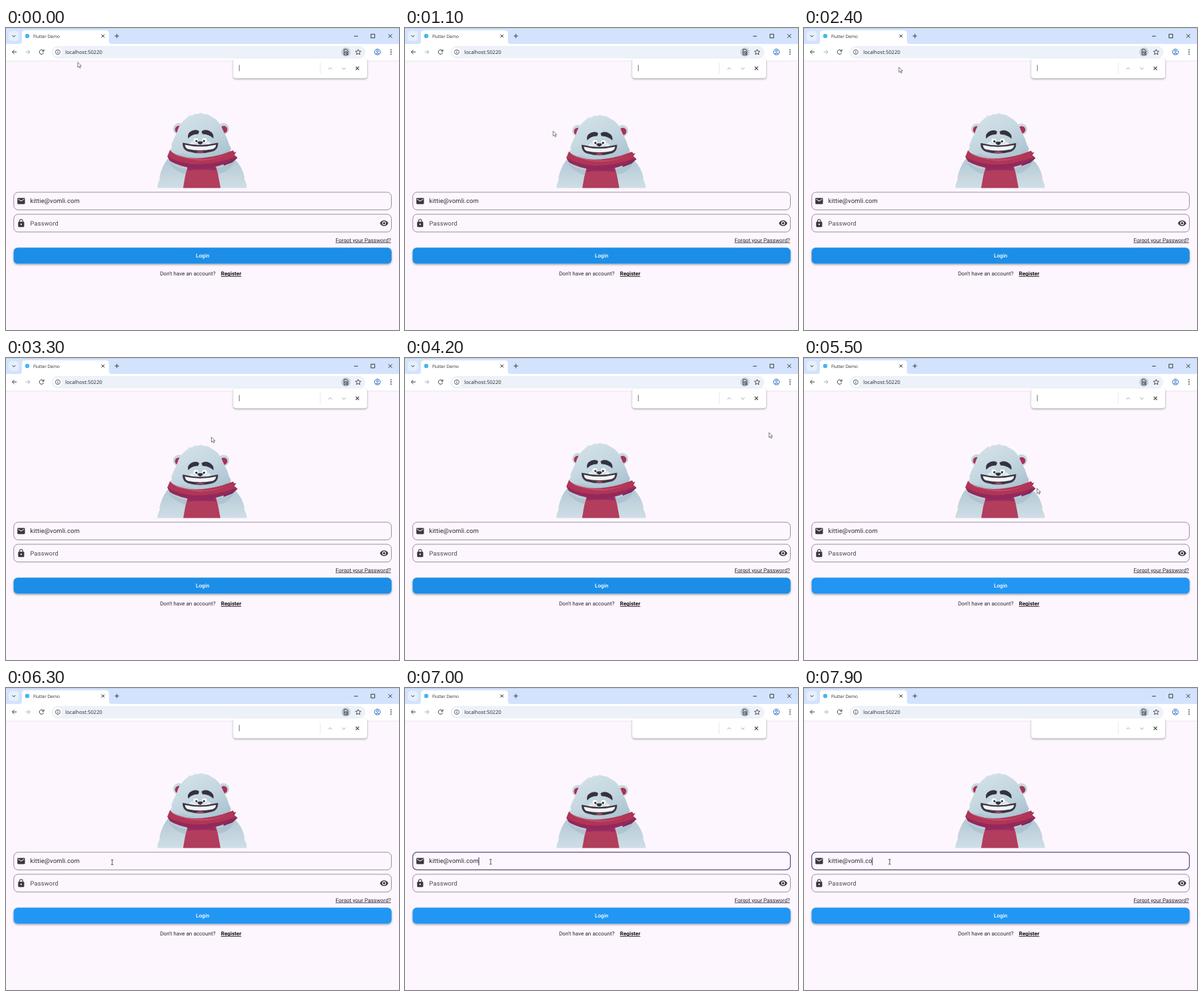
Recreate the animation shown at these times as an HTML page. Size 592 by 454 pixels, loop 8000 ms.

```html
<!DOCTYPE html>
<html lang="en">
<head>
<meta charset="utf-8">
<title>Login</title>
<style>
html, body { margin: 0; width: 100%; height: 100%; overflow: hidden; background: #fdf6fe; }
svg { display: block; }
text { font: 8.15px Roboto, sans-serif; letter-spacing: .02px; fill: #28252c; text-rendering: geometricPrecision; }
.ui { font-family: "Open Sans", sans-serif; letter-spacing: 0; }
.field { font-size: 9.3px; letter-spacing: .17px; }
.link { text-decoration: underline; }
.line { fill: none; stroke: #36383c; stroke-width: 1; }
.box { fill: none; stroke: #7d7882; stroke-width: .8; }
.icon { fill: #3b3740; }
</style>
</head>
<body>
<svg width="592" height="454" viewBox="0 0 592 454">
  <defs>
    <filter id="shadow" x="-10%" y="-30%" width="120%" height="180%">
      <feDropShadow dx="0" dy="1.4" stdDeviation="1.7" flood-opacity=".4"/>
    </filter>
    <linearGradient id="fur" x1="0" y1="0" x2=".6" y2="1">
      <stop stop-color="#d8e4ea"/><stop offset=".55" stop-color="#c4d7e0"/><stop offset="1" stop-color="#aac2d0"/>
    </linearGradient>
    <linearGradient id="coat" x1="0" y1="0" x2="0" y2="1">
      <stop stop-color="#b0c6d2"/><stop offset="1" stop-color="#d0dfe7"/>
    </linearGradient>
    <clipPath id="cut"><path d="M200 100H400V240.500H200Z"/></clipPath>
  </defs>

  <!-- browser frame -->
  <path fill="#d3e3fd" d="M0 0H592V24H0Z"/>
  <path fill="#bcc9de" d="M0 0H592V.8H0Z"/>
  <path fill="#fff" d="M0 24H20Q24 24 24 20V8Q24 3.500 28.500 3.500H150.500Q155 3.500 155 8V20Q155 24 159 24H592V49.500H0Z"/>
  <path stroke="#e3e0e8" stroke-width=".7" d="M0 49.700H592"/>
  <rect x="4" y="4.500" width="15.500" height="15" rx="5" fill="#e6effd"/>
  <path class="line" d="M9.500 11 11.800 13.300 14.100 11M143.700 9.700l4.600 4.600m0-4.600l-4.600 4.600M163.800 12h6.400M167 8.800v6.400"/>
  <circle cx="32" cy="12" r="3.200" fill="#48b5ef"/>
  <text class="ui" x="41" y="14.500" style="font-size:6.500px">Flutter Demo</text>
  <path class="line" stroke-width=".9" d="M524.300 12.300h5.600M549.800 9.300h5.600v5.600h-5.600zM576 9.300l5.600 5.600m0-5.600l-5.600 5.600"/>

  <rect x="68.500" y="27" width="473" height="18.800" rx="9.400" fill="#edf2fa"/>
  <path class="line" d="M16 36H9.500M12.500 32.900 9.400 36 12.500 39.100"/>
  <path class="line" style="stroke:#aaacb0" d="M29.700 36h6.300M33 32.900 36.100 36 33 39.100"/>
  <path class="line" d="M56.600 34.700A3.300 3.300 0 1 0 56.700 37.200M57 32.200V35H54.200"/>
  <circle cx="78" cy="36.200" r="6.800" fill="#fff"/>
  <circle class="line" cx="78" cy="36.200" r="3.500" style="stroke-width:.8"/>
  <path class="line" d="M78 35.700v2.500M78 34v.9"/>
  <text class="ui" x="89.300" y="39.400" style="font-size:7.600px">localhost:50220</text>
  <circle cx="512" cy="36.200" r="7" fill="#c9d2df"/>
  <path class="line" d="M509.200 32h3.800l2 2v6.400h-5.800z"/>
  <circle class="line" cx="512.200" cy="36.800" r="1.500"/>
  <path class="line" d="M513.300 38l1.500 1.700"/>
  <path class="line" style="stroke-width:.9" d="M530.500 32.100l1.200 2.700 2.900.3-2.200 1.900.7 2.900-2.600-1.500-2.600 1.500.7-2.900-2.200-1.900 2.900-.3z"/>
  <g class="line" style="stroke:#2868c8"><circle cx="559.500" cy="36" r="4.300"/><circle cx="559.500" cy="34.800" r="1.500"/><path d="M556.500 39q3-2.200 6 0"/></g>
  <g class="icon"><circle cx="580" cy="32.800" r=".9"/><circle cx="580" cy="36" r=".9"/><circle cx="580" cy="39.200" r=".9"/></g>

  <!-- bear -->
  <g clip-path="url(#cut)">
    <g id="body">
      <path fill="url(#coat)" d="M246 194Q238 202 233 217L231 225 232 226 228.500 235 228 242H363L362 234 358.500 226 359.500 225Q356 208 345 198L336 190H252Z"/>
      <path fill="#97aebe" opacity=".4" d="M245 202Q264 214 282 212L272 220Q254 216 245 202ZM316 211Q333 208 345 199 338 216 321 219Z"/>
    </g>
    <g id="head">
      <g fill="#c6d8e1"><circle cx="260.500" cy="150.500" r="8.700"/><circle cx="327.500" cy="150.500" r="8.700"/></g>
      <g fill="#aa3156"><circle cx="260" cy="151.500" r="5.500"/><circle cx="328" cy="151.500" r="5.500"/></g>
      <path fill="url(#fur)" d="M270 136 277 130 279 131 286 127.500 288 128.500 294 126.500 297 128 304 129 309 132Q322 138 327 153L333 165 336 174 339 180 336 189Q318 207 291 205 262 205 249 192L246 184 250 178 249 175 253 165 257 157Q261 143 270 136Z"/>
      <path fill="#a9c1cf" opacity=".6" d="M266 187Q292 199 323 187L335 181 335 190Q314 207 291 205 266 204 250 192Z"/>
      <path fill="#35323f" d="M274.500 165Q272 157.500 280 153.500 288 150.500 291 154.500L289.500 158.500Q280 158 274.500 165ZM296 158.500 294.500 154.500Q299 150.500 306 153.500 314 157.500 312.500 165 305 158 296 158.500Z"/>
      <path fill="#e0eaef" d="M276 172Q284 165 292.500 168 302 165 309 172L305 178H280Z"/>
      <g fill="#fff" stroke="#a8bbc8" stroke-width=".6"><circle cx="286" cy="168" r="4.100"/><circle cx="299" cy="168" r="4.100"/></g>
      <g fill="#30333d"><circle cx="286.800" cy="168.800" r="1.700"/><circle cx="298.300" cy="168.800" r="1.700"/>
        <path d="M288.500 170Q292.500 168.500 296.800 170 297 172.200 293.700 174.200H291.800Q288 172.200 288.500 170Z"/></g>
      <path fill="#403543" d="M266 171.500 269 172Q292 178 316.500 172L319.500 171.500Q320 181.500 311.500 184.500 292 190 274 184.500 265.500 181.500 266 171.500Z"/>
      <path fill="#f2f5f7" d="M269.500 174.500Q292 180 316.500 174.500 316 179 311.500 181 292 185 274 181 270 179.500 269.500 174.500Z"/>
      <path fill="#c24264" d="M286 185.500Q292.500 182.500 299 185.500 293 187.500 286 185.500Z"/>
    </g>
    <g id="scarf">
      <path fill="#7d285a" d="M325 194 347 186 343 192 349 195 341 202 328 207Z"/>
      <path fill="#b23d5c" d="M274 207 316 207 319 218 323.500 242H266.500L270 222Z"/>
      <path fill="#982b63" d="M273 208Q291 213 306 208L313 206 317 214Q296 212 274 214Z"/>
      <path fill="#b03556" d="M247 183.500Q253 191 265 194 292 199 325 190L342 184 345 188 343 190 348 194 341 198Q327 207 301 210 272 213 247 199L243 193Z"/>
      <path fill="#93295b" d="M243 193Q259 203 286 205 319 205 347 193L340 199Q325 208 301 211 270 213 247 200Z"/>
      <path fill="#c64d6b" d="M249 186Q265 196 292 197 314 198 333 190 313 200 289 199 264 197 249 186Z"/>
    </g>
  </g>

  <!-- form -->
  <rect id="email" class="box" x="11.700" y="246.900" width="568.800" height="26.500" rx="6.500"/>
  <rect class="box" x="11.700" y="280" width="568.800" height="26.700" rx="6.500"/>
  <path class="icon" transform="translate(16 253.300) scale(.57)" d="M20 4H4c-1.100 0-2 .9-2 2v12c0 1.100.9 2 2 2h16c1.100 0 2-.9 2-2V6c0-1.100-.9-2-2-2zm0 4l-8 5-8-5V6l8 5 8-5z"/>
  <path class="icon" transform="translate(16 286.600) scale(.57)" d="M18 8h-1V6A5 5 0 0 0 7 6v2H6c-1.100 0-2 .9-2 2v10c0 1.100.9 2 2 2h12c1.100 0 2-.9 2-2V10c0-1.100-.9-2-2-2zm-6 9a2 2 0 1 1 0-4 2 2 0 0 1 0 4zm3.100-9H8.900V6a3.100 3.100 0 0 1 6.200 0z"/>
  <path class="icon" transform="translate(562.700 286.600) scale(.57)" d="M12 4.500C7 4.500 2.700 7.600 1 12c1.700 4.400 6 7.500 11 7.500s9.300-3.100 11-7.500c-1.700-4.400-6-7.500-11-7.500zM12 17a5 5 0 1 1 0-10 5 5 0 0 1 0 10zm0-8a3 3 0 1 0 0 6 3 3 0 0 0 0-6z"/>
  <text id="address" class="field" x="36.500" y="263.200">kittie@vomli.com</text>
  <path id="caret" stroke="#4b3d70" stroke-width="1.100" d="M0 254.500V266.500"/>
  <text class="field" x="36.500" y="296.700" style="fill:#49454f">Password</text>
  <text class="link" x="496.500" y="321.500">Forgot your Password?</text>
  <rect id="login" x="11.500" y="330.200" width="569.300" height="24" rx="6" filter="url(#shadow)"/>
  <text x="286" y="345.200" style="fill:#fff;font-weight:500">Login</text>
  <text x="232" y="372.100">Don't have an account?</text>
  <text class="link" x="323.800" y="372.100" style="font-weight:700;fill:#111;letter-spacing:0">Register</text>

  <!-- find bar -->
  <rect x="342.500" y="45.800" width="201.500" height="29.500" rx="4" fill="#fff" filter="url(#shadow)"/>
  <path stroke="#dde3ee" stroke-width=".8" d="M473.300 52V69"/>
  <path class="line" style="stroke:#a2a4a8" d="M485.700 62.200 488.300 59.600 490.900 62.200M506.200 59.600 508.800 62.200 511.400 59.600"/>
  <path class="line" style="stroke-width:1.100" d="M526.800 58.200l5 5m0-5l-5 5"/>
  <path id="findCaret" stroke="#555" stroke-width=".8" d="M351.400 55.500V65"/>

  <path id="arrow" fill="#fff" stroke="#444" stroke-width=".7" d="M0 0V7.600L1.800 6 3.100 8.800 4.400 8.200 3.200 5.500H5.500Z"/>
  <path id="beam" fill="none" stroke="#333" stroke-width=".8" d="M-1.700-3.600H1.700M-1.700 3.600H1.700M0-3.600V3.600"/>
</svg>
<script>
const $ = id => document.getElementById(id);
const LOOP = 8000, CLICK = 6700, ERASE = 7700;
const address = $("address"), full = address.textContent;

// pointer stops: time, x, y
const stops = [
  [0, 108, 51.5], [200, 108, 51.5], [1000, 223, 155], [1800, 226, 152], [2400, 143, 59], [2700, 106, 52],
  [3000, 120, 110], [3650, 546, 130], [4200, 548.3, 112], [4600, 440, 335],
  [5000, 330, 345], [5500, 351, 196], [5900, 300, 345], [6300, 160, 262],
  [6500, 129, 261.3], [LOOP, 129, 261.3]
];

function pointer(t) {
  const i = stops.findIndex(s => s[0] > t), [t0, x0, y0] = stops[i - 1], [t1, x1, y1] = stops[i];
  const u = (t - t0) / (t1 - t0), k = u * u * (3 - 2 * u);
  return [x0 + (x1 - x0) * k, y0 + (y1 - y0) * k];
}

const show = (id, on) => $(id).setAttribute("visibility", on ? "visible" : "hidden");
const move = (id, x, y) => $(id).setAttribute("transform", `translate(${x} ${y})`);

function draw(t) {
  const breath = (1 - Math.cos((t - 100) * Math.PI / 1000)) / 2;
  move("head", 0, 1 + 3 * breath);
  move("scarf", 0, 2 * breath);
  move("body", 0, breath);

  const [x, y] = pointer(t), overField = y > 247 && y < 307;
  move("arrow", x, y);
  move("beam", x, y);
  show("arrow", !overField);
  show("beam", overField);

  const focused = t >= CLICK, erased = t >= ERASE;
  $("email").style.stroke = focused ? "#574b80" : "";
  $("email").style.strokeWidth = focused ? 1.2 : "";
  $("login").setAttribute("fill", t < 5200 ? "#1e8ee7" : "#2196f3");
  address.textContent = erased ? full.slice(0, -1) : full;
  move("caret", 36.7 + address.getComputedTextLength(), 0);
  show("caret", focused && (t - (erased ? ERASE : CLICK)) % 1000 < 500);
  show("findCaret", !focused && (t + 100) % 1060 < 530);
}

function tick() {
  draw(performance.now() % LOOP);
  requestAnimationFrame(tick);
}
tick();
</script>
</body>
</html>
```
